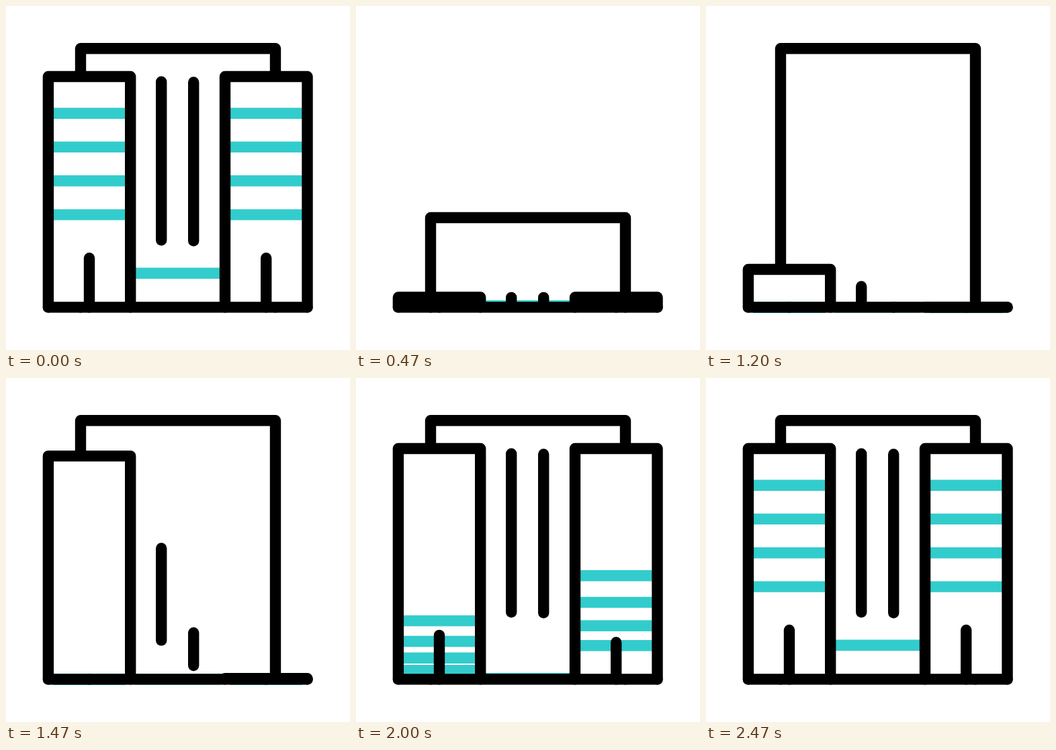
Write an HTML page that moves like this. It is 512x512 px and loops after 2.99 s.

```html
<!DOCTYPE html>
<html lang="en">
<head>
<meta charset="utf-8">
<title>Building</title>
<style>
  html, body { margin: 0; width: 100%; height: 100%; overflow: hidden; background: #fff; }
  svg { display: block; width: 100%; height: 100%; }
</style>
</head>
<body>
<svg id="stage" viewBox="0 0 512 512"></svg>
<script>
const LOOP = 2990, FPS = 15;
const GROUND = 448.4, LINE = 16.4;
const COLLAPSE = 600, REBUILD = 800;
const TEAL = '#33cccc';
const stage = document.getElementById('stage');

const clamp = x => Math.min(1, Math.max(0, x));
const smooth = u => u * u * (3 - 2 * u);
const easeOut = u => 1 - (1 - u) ** 2;
const collapseEase = u => smooth(1 - (1 - u) ** 1.38);

function addPath(attrs) {
  const el = document.createElementNS('http://www.w3.org/2000/svg', 'path');
  for (const key in attrs) el.setAttribute(key, attrs[key]);
  stage.append(el);
  return el;
}

const ink = {
  fill: 'none', stroke: '#000', 'stroke-width': LINE,
  'stroke-linecap': 'round', 'stroke-linejoin': 'round'
};
const teal = { fill: 'none', stroke: TEAL, 'stroke-width': LINE };
const white = { fill: '#fff' };

// Every part is squashed towards the ground; low is its smallest height.
const parts = [];
function addPart(style, start, span, shape, low = 0, ease = smooth) {
  parts.push({ el: addPath(style), start, span, shape, low, ease });
}

const box = (left, right, top) => y =>
  `M${left} ${GROUND}V${y(top)}H${right}V${GROUND}`;
const column = (x, top, bottom) => y => `M${x} ${y(top)}V${y(bottom)}`;
const stripe = (left, right, at) => y => `M${left} ${y(at)}H${right}`;

const leftTower = [1092, 420, box(62.9, 185.2, 105)];
const rightTower = [1453, 410, box(326, 448.5, 105)];

addPart({ ...ink, fill: '#fff' }, REBUILD, 282, box(111, 401, 63.3), 0.317);
addPart(white, ...leftTower);
addPart(white, ...rightTower);

const rows = [159.7, 209.9, 260.2, 310.6];
const stripes = [
  ...rows.map(at => stripe(333, 441, at)),
  ...rows.map(at => stripe(70, 178, at)),
  stripe(192, 319, 397.8)
];
stripes.forEach((shape, i) =>
  addPart(teal, 1847.7 + i * 18.36, 480, shape, 0, easeOut));

addPart(ink, 1064, 727, column(231.2, 112.7, 348.5));
addPart(ink, 1303, 560, column(279.2, 113.5, 349.5));
addPart(ink, 1680, 400, column(124, 375.3, GROUND));
addPart(ink, 1730, 400, column(387.2, 375.3, GROUND));
addPart(ink, ...leftTower);
addPart(ink, ...rightTower);
addPath({ ...ink, d: `M62.9 ${GROUND}H448.5` });

function draw(ms) {
  // Steps fall on the nearest 10 ms.
  const step = Math.floor((Math.floor(ms / 10) * 10 + 5) * FPS / 1000);
  const t = step * 1000 / FPS;
  for (const { el, start, span, shape, low, ease } of parts) {
    const grown = t < REBUILD
      ? 1 - collapseEase(clamp(t / COLLAPSE))
      : ease(clamp((t - start) / span));
    const height = low + (1 - low) * grown;
    const y = v => (GROUND - (GROUND - v) * height).toFixed(2);
    el.setAttribute('d', shape(y));
  }
}

const begin = performance.now();
function tick() {
  draw((performance.now() - begin) % LOOP);
  requestAnimationFrame(tick);
}
draw(0);
requestAnimationFrame(tick);
</script>
</body>
</html>
```
